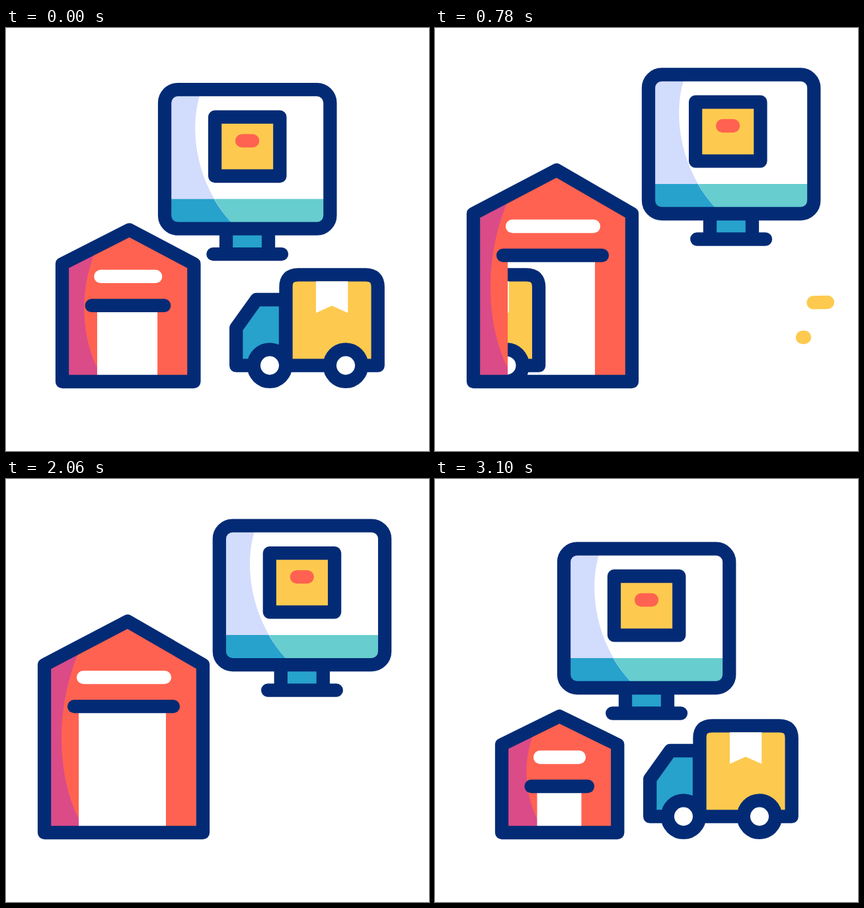
An HTML page for the animation above (3260 ms loop, 640x640 px).

```html
<!DOCTYPE html>
<html lang="en">
<head>
<meta charset="utf-8">
<title>Warehouse delivery</title>
<style>
  html, body { margin: 0; width: 100%; height: 100%; overflow: hidden; background: #fff; }
  svg { display: block; width: 100vw; height: 100vh; }
  .line { stroke: #032b75; stroke-width: 20.3; stroke-linecap: round; stroke-linejoin: round; }
  .navy { fill: #032b75; }
  .white { fill: #fff; }
  .red { fill: #ff6250; }
  .pink { fill: #da4b88; }
  .lilac { fill: #d2dcfd; }
  .blue { fill: #27a2cc; }
  .mint { fill: #67cdcf; }
  .gold { fill: #fdca4f; }
  .none { fill: none; }
  .pill { fill: none; stroke-width: 20.3; stroke-linecap: round; }
</style>
</head>
<body>
<svg viewBox="0 0 640 640">
  <defs>
    <clipPath id="screen"><rect x="195" y="105.5" width="250.3" height="210.5" rx="19"/></clipPath>
    <clipPath id="inside"><path class="wall"/></clipPath>
    <clipPath id="street"><rect x="110" y="0" width="530" height="640"/></clipPath>
    <g id="parcel">
      <rect class="gold line" x="271" y="147" width="98.3" height="89.3"/>
      <path class="pill" stroke="#ff6250" d="M312 183H328"/>
    </g>
  </defs>

  <g id="monitor">
    <rect class="blue" x="288" y="316" width="64" height="38"/>
    <path class="line none" d="M288 318V350M352 318V350M268.3 354.5H372"/>
    <rect class="white" x="195" y="105.5" width="250.3" height="210.5" rx="19"/>
    <g clip-path="url(#screen)">
      <rect class="mint" x="195" y="271" width="251" height="46"/>
      <path class="lilac" d="M190 100H253L248 115C234 160 238 240 295 306L303 316H190Z"/>
      <path class="blue" d="M190 271H269.5Q280 289 295 306L303 317H190Z"/>
      <g id="belt">
        <use href="#parcel"/>
        <use href="#parcel" x="203"/>
        <use href="#parcel" x="447"/>
      </g>
    </g>
    <rect class="line none" x="195" y="105.5" width="250.3" height="210.5" rx="20"/>
  </g>

  <g id="house">
    <path class="wall red"/>
    <g clip-path="url(#inside)"><path class="shade pink"/></g>
    <path class="door white"/>
    <path class="wall line none"/>
    <path class="sign pill" stroke="#fff"/>
    <path class="lintel line none"/>
  </g>

  <path id="dashA" class="pill" stroke="#fdca4f"/>
  <path id="dashB" class="pill" stroke="#fdca4f"/>

  <g clip-path="url(#street)">
    <g id="truck">
      <path class="blue line" d="M400 411H356L325.2 454V510.7H400Z"/>
      <path class="gold line" d="M400.5 510.7V392Q400.5 373.3 419 373.3H521Q539.7 373.3 539.7 392V510.7Z"/>
      <path class="white" d="M446 383.3H494.3V431L470 420.3L446 431Z"/>
      <circle class="white line" cx="376" cy="510.6" r="24.2"/>
      <circle class="white line" cx="491" cy="510.6" r="24.2"/>
    </g>
  </g>
</svg>
<script>
const LOOP = 3260;
const $ = id => document.getElementById(id);

// Low and tall form of each house part
const shapes = {
  wall: ['M101 535V402L188.3 359L276.3 402V535Z', 'M58 535V281L184 215L298 281V535Z'],
  shade: ['M90 340H160L151 380C132 425 134 480 160 525V545H90Z',
          'M40 200H140L118 245C72 335 74 455 116 525V545H40Z'],
  door: ['M154.5 465H221.5V525H154.5Z', 'M110 344H242V525H110Z'],
  sign: ['M159 421H218', 'M117 300H240'],
  lintel: ['M145.5 465H231', 'M103 344H253']
};

const ease = x => x * x * (3 - 2 * x);

// Eased value at time t through [time, value] keys
function track(t, keys) {
  if (t <= keys[0][0]) return keys[0][1];
  for (let i = 1; i < keys.length; i++) {
    const [t0, a] = keys[i - 1], [t1, b] = keys[i];
    if (t < t1) return a + (b - a) * ease((t - t0) / (t1 - t0));
  }
  return keys[keys.length - 1][1];
}

function morph([low, tall], k) {
  const to = tall.match(/[\d.]+/g);
  let i = 0;
  return low.replace(/[\d.]+/g, n => (+n + (to[i++] - n) * k).toFixed(2));
}

const move = (id, x, y = 0) => $(id).setAttribute('transform', `translate(${x} ${y})`);

// A speed line whose head runs ahead of its tail
function dash(id, t, start, headEnd, tailEnd, [x0, y0], [x1, y1]) {
  const at = k => `${x0 + (x1 - x0) * k} ${y0 + (y1 - y0) * k}`;
  const head = track(t, [[start, 0], [headEnd, 1]]);
  const tail = track(t, [[start, 0], [tailEnd, 1]]);
  $(id).style.display = t > start && t < tailEnd ? '' : 'none';
  $(id).setAttribute('d', `M${at(tail)}L${at(head)}`);
}

function draw(t) {
  const grow = track(t, [[-206, 0], [294, 1], [2050, 1], [2603, 0]]);
  for (const name in shapes) {
    const d = morph(shapes[name], grow);
    document.querySelectorAll('.' + name).forEach(el => el.setAttribute('d', d));
  }

  const shift = track(t, [[-191, 0], [289, 1], [2050, 1], [2532, 0]]);
  move('monitor', 128 * shift, -35 * shift);

  move('belt', track(t, [[338, 0], [720, -209], [940, -203], [1180, -203], [1710, -453], [1790, -447]]));

  move('truck', t < 1500
    ? track(t, [[30, 23], [1015, -450]])
    : track(t, [[2097, 360], [3100, 0]]));

  dash('dashA', t, 350, 666, 947, [480, 417.3], [594, 415]);
  dash('dashB', t, 313, 523, 844, [480, 468.7], [559, 468]);
}

const start = performance.now();
function frame() {
  draw((performance.now() - start) % LOOP);
  requestAnimationFrame(frame);
}
frame();
</script>
</body>
</html>
```
